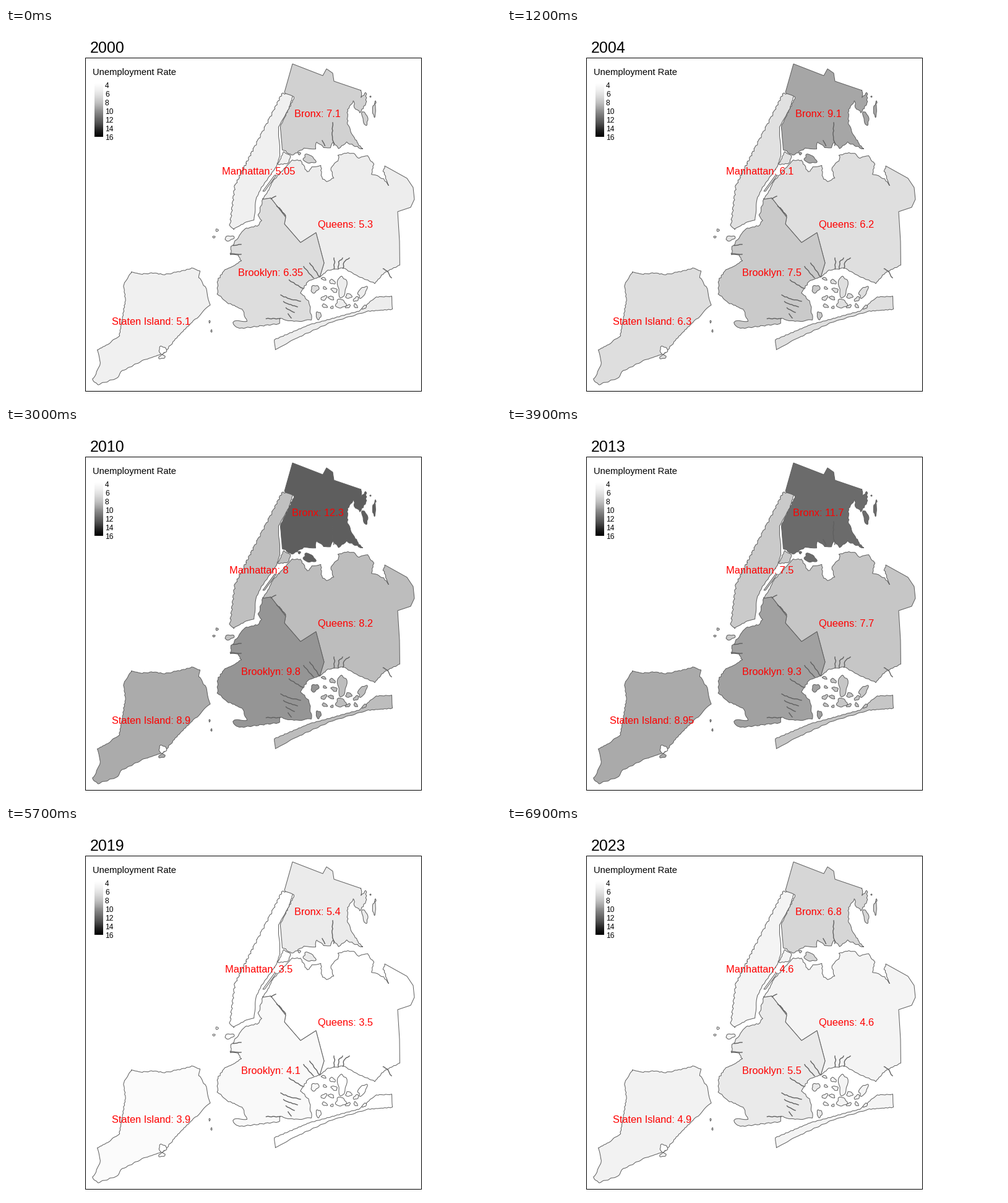
Recreate the animation shown at these times as a matplotlib script. Size 800 px wide and 600 px high, loop 7.2 s.

```python
import math
import random
import numpy as np
import matplotlib.pyplot as plt
from matplotlib.animation import FuncAnimation
from matplotlib.colors import LinearSegmentedColormap
from matplotlib.patches import Polygon, Rectangle

plt.rcParams["font.family"] = "Liberation Sans"
random.seed(4)
DPI = 100
PIXEL = 72 / DPI
EDGE = "#5f5f5f"
LOW, HIGH = 3.5, 16
STEPS = [255, 240, 217, 189, 150, 115, 82, 37, 0]
GREYS = LinearSegmentedColormap.from_list(
    "greys", [(v / 255,) * 3 for v in STEPS], N=512)

# Rates at the turning points; every stretch between swells or sags by SWING.
YEARS = [2000, 2004, 2008, 2013, 2019, 2021, 2023]
SWING = [0.2, -0.19, 0.36, -0.22, 0.66, -0.23]
RATES = {
    "Queens": [5.3, 6.2, 5, 7.7, 3.5, 9.9, 4.6],
    "Brooklyn": [6.35, 7.5, 6, 9.3, 4.1, 10.4, 5.5],
    "Manhattan": [5.05, 6.1, 4.9, 7.5, 3.5, 7.8, 4.6],
    "Bronx": [7.1, 9.1, 7.5, 11.7, 5.4, 13.85, 6.8],
    "Staten Island": [5.1, 6.3, 5.1, 8.95, 3.9, 9, 4.9],
}
LABELS = {"Bronx": (503.5, 144), "Brooklyn": (428, 401),
          "Manhattan": (408.5, 237), "Queens": (548.5, 323),
          "Staten Island": (234.5, 480)}


def rate_in(name, year):
    rates = RATES[name]
    if year in YEARS:
        return rates[YEARS.index(year)]
    k = sum(y < year for y in YEARS) - 1
    u = (year - YEARS[k]) / (YEARS[k + 1] - YEARS[k])
    base = rates[k] + (rates[k + 1] - rates[k]) * u
    return round(base * (1 + SWING[k] * math.sin(math.pi * u)), 1)


def rough(points, amp=0.8, step=3):
    """Split a line into short pieces and ruffle them by position."""
    out = []
    for (x0, y0), (x1, y1) in zip(points, points[1:]):
        n = max(1, round(math.hypot(x1 - x0, y1 - y0) / step))
        for i in range(n):
            x = x0 + (x1 - x0) * i / n
            y = y0 + (y1 - y0) * i / n
            out.append((x + amp * math.sin(12.9 * x + 7.3 * y),
                        y + amp * math.sin(8.1 * x - 15.7 * y)))
    return out + [points[-1]]


def island(points, amp=0.5):
    return rough(points + points[:1], amp)


def blob(x, y, rx, ry, lean=0.0):
    pts = []
    for a in np.linspace(0, 2 * math.pi, 10 + int(rx + ry), endpoint=False):
        r = 1 + 0.15 * math.sin(3 * a + x) + 0.1 * math.sin(5 * a + y)
        dy = ry * r * math.sin(a)
        pts.append((x + rx * r * math.cos(a) - lean * dy, y + dy))
    return pts


def bay_islands():
    """Small marsh islands in loose rows, fewer in the narrow top of the bay."""
    out = [blob(543, 418, 7, 17), blob(541, 446, 8, 7),
           blob(576, 427, 6, 9, 0.4)]
    for row in range(4):
        for x in range(515, 536 + 18 * row, 13):
            if abs(x - 543) > 9:
                out.append(blob(x + random.uniform(-3, 3),
                                408 + 14 * row + random.uniform(-3, 3),
                                random.uniform(2, 5), random.uniform(2, 4),
                                random.uniform(-0.8, 0.8)))
    return out


staten = island([
    (203, 394), (220, 398), (238, 396), (256, 399), (275, 395), (303, 388),
    (313, 393), (312, 403), (323, 421), (330, 448), (308, 469), (292, 484),
    (270, 508), (256, 525), (226, 536), (208, 544), (186, 556), (180, 566),
    (148, 577), (139, 568), (145, 560), (153, 541), (147, 521), (162, 513),
    (183, 498), (188, 470), (193, 440), (190, 415)], 0.7)

manhattan = rough([(464, 108), (457, 130), (440, 160), (443, 205), (437, 224),
                   (413, 258), (404, 276), (401, 311), (388, 314),
                   (368, 325)], 0.4)
manhattan += rough([(368, 325), (362, 318), (370, 255), (400, 195),
                    (432, 134), (446, 106), (454, 106), (464, 108)], 1.1, 2)

bronx = [(450, 104), (463, 58), (512, 77), (518, 66), (528, 73), (530, 86),
         (574, 101)]
bronx += rough([
    (574, 101), (574, 112), (582, 104), (582, 122), (572, 137), (563, 128),
    (562, 117), (552, 131), (552, 156), (564, 180), (576, 196), (550, 185),
    (537, 195), (529, 184), (524, 193), (514, 194), (502, 184), (500, 195),
    (481, 195), (462, 206), (446, 196), (443, 160), (466, 112), (450, 104)])

border = [(415, 277), (428, 275), (452, 306), (450, 317), (476, 347),
          (501, 331), (514, 380), (507, 403)]

queens = rough([
    (415, 277), (433, 246), (462, 214), (476, 214), (487, 233), (495, 225),
    (509, 222), (510, 242), (519, 249), (529, 242), (525, 226), (538, 212),
    (537, 206), (550, 202), (563, 203), (570, 211), (584, 206), (594, 220),
    (591, 236), (611, 244), (618, 255), (610, 231), (612, 223)])
queens += [(648, 243), (658, 258), (660, 277), (654, 290), (633, 297),
           (636, 345)]
queens += rough([(637, 383), (611, 396), (596, 413), (570, 402), (545, 388),
                 (520, 392), (507, 403)], 0.6)
queens += border[::-1]

rockaway = island([(435, 520), (434, 504), (490, 480), (570, 458), (598, 435),
                   (623, 434), (625, 455), (585, 458), (525, 476),
                   (475, 499)])

brooklyn = border + rough([
    (507, 403), (488, 410), (476, 428), (490, 443), (494, 472), (466, 475),
    (443, 470), (443, 478), (378, 486), (367, 480), (368, 474), (389, 474),
    (382, 455), (357, 444), (342, 430), (342, 408), (352, 393), (380, 377),
    (375, 367), (363, 367), (364, 354), (385, 325), (408, 319), (413, 312),
    (408, 303), (415, 277)])

LAND = {
    "Queens": [queens, rockaway] + bay_islands(),
    "Brooklyn": [brooklyn, blob(499, 422, 6, 6, 0.3), blob(505, 465, 4, 6)],
    "Manhattan": [
        manhattan,
        island([(449, 200), (460, 207), (456, 219), (439, 221)]),
        [(415, 264), (434, 238), (437, 238), (418, 264)],
        blob(361, 340, 7, 4, 0.6), blob(341, 327, 2, 2),
        blob(336, 338, 2, 1.5)],
    "Bronx": [bronx, blob(490, 212, 9, 7, -0.4), blob(474, 203, 2, 2),
              blob(580, 146, 4, 11, -0.2), blob(595, 133, 2.5, 10),
              blob(589, 111, 1, 1), blob(597, 120, 1, 2)],
    "Staten Island": [staten, blob(252, 532, 5, 3, 0.5), blob(329, 475, 1, 2),
                      blob(332, 490, 1, 2)],
}

CREEKS = [
    [(530, 190), (527, 175), (528, 153)], [(515, 190), (511, 182)],
    [(428, 276), (436, 272)], [(438, 288), (444, 293), (452, 304)],
    [(457, 408), (480, 421)], [(481, 386), (497, 404)],
    [(491, 380), (506, 402)], [(609, 389), (616, 393), (623, 404)],
    [(362, 364), (380, 366)], [(367, 352), (380, 350)],
    [(420, 470), (443, 470)],
]
CREEKS += [[(x, 389), (x + 1, 378), (x + 1 + tip, 372)]
           for x, tip in ((530, -1), (537, 6), (545, 9))]
CREEKS += [[(444 + 4 * k, 432 + 10 * k), (458, 438 + 9 * k),
            (476 - 5 * k, 442 + 9 * k)] for k in range(4)]

fig = plt.figure(figsize=(8, 6), dpi=DPI, facecolor="white")
ax = fig.add_axes([0, 0, 1, 1])
ax.axis("off")


def write(x, y, text, px, **kw):
    return ax.text(x, y, text, fontsize=px * PIXEL, va="baseline", **kw)


def add_land(points, **kw):
    return ax.add_patch(Polygon(points, closed=True, edgecolor=EDGE,
                                linewidth=PIXEL, snap=False, **kw))


shapes = {name: [add_land(p) for p in parts] for name, parts in LAND.items()}
add_land(blob(253, 521, 6, 6), facecolor="white")
for creek in CREEKS:
    ax.plot(*zip(*rough(creek, 0.6)), color=EDGE, lw=1.4 * PIXEL)

ramp = np.linspace(LOW, HIGH, 88)[:, None]
ax.imshow(ramp, cmap=GREYS, vmin=LOW, vmax=HIGH, extent=(143, 157, 176, 89),
          aspect="auto", interpolation="nearest")
ax.add_patch(Rectangle((128.5, 48.5), 543, 539, fill=False, edgecolor="black",
                       linewidth=PIXEL, snap=False))
write(140.3, 76, "Unemployment Rate", 14.7)
for v in range(4, 17, 2):
    write(160, 97 + (v - 4) * 7, str(v), 12)

title = write(135.8, 40, "", 25)
tags = {name: write(x, y, "", 16.4, color="red", ha="center")
        for name, (x, y) in LABELS.items()}
ax.set_xlim(0, 800)
ax.set_ylim(600, 0)


def draw(i):
    year = YEARS[0] + i
    title.set_text(str(year))
    for name, tag in tags.items():
        rate = rate_in(name, year)
        tag.set_text(f"{name}: {rate:g}")
        tone = GREYS((rate - LOW) / (HIGH - LOW))
        for shape in shapes[name]:
            shape.set_facecolor(tone)
    return [title, *tags.values()]


anim = FuncAnimation(fig, draw, frames=24, interval=300, repeat=True,
                     repeat_delay=0, blit=False)
plt.show()
```
